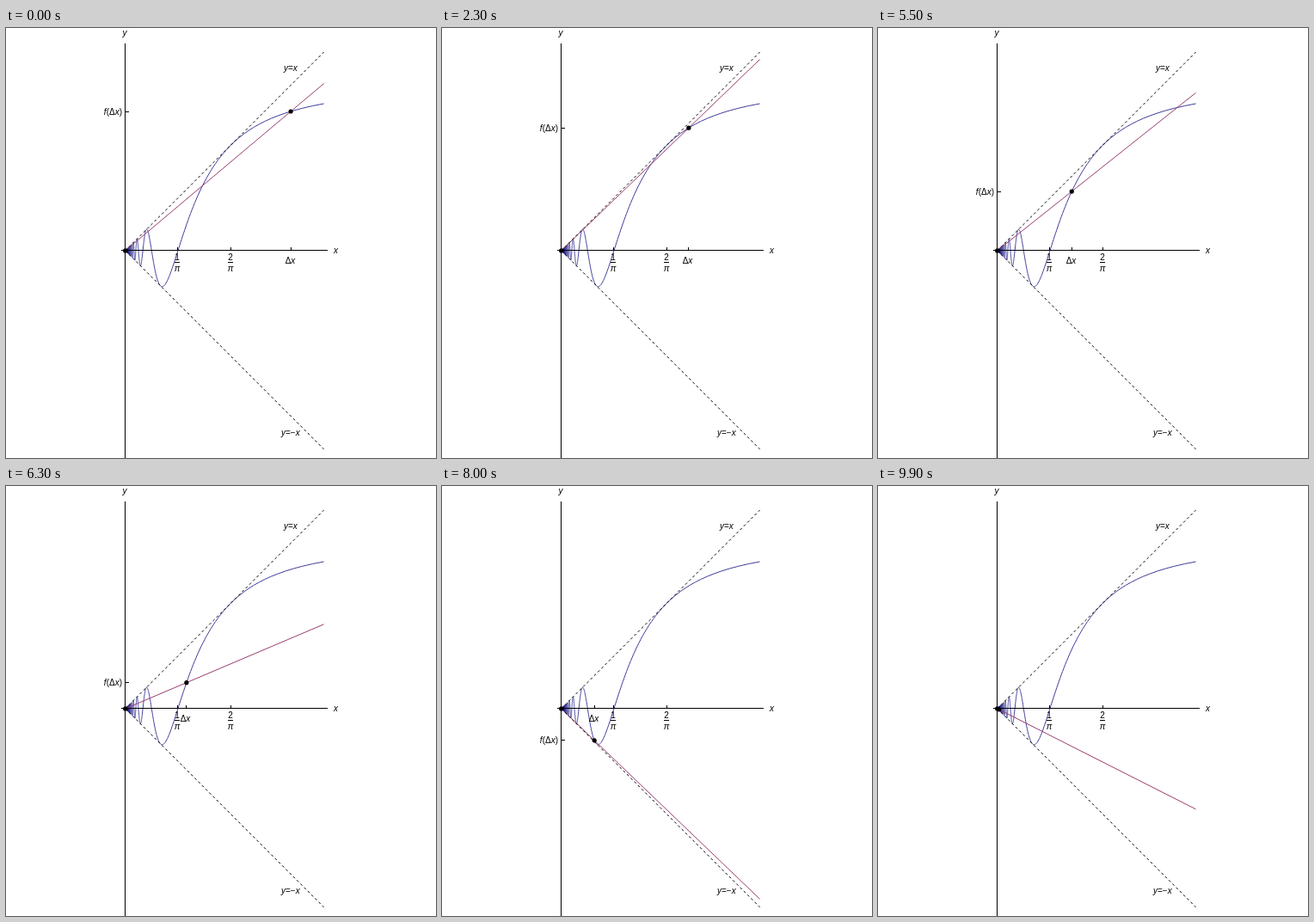
An HTML page for the animation above (10 s loop, 500 px wide and 500 px high).

```html
<!DOCTYPE html>
<html lang="en">
<head>
<meta charset="utf-8">
<title>Secants of x sin(1/x)</title>
<style>
html, body { margin: 0; width: 100%; height: 100%; overflow: hidden; background: #fff; }
svg { display: block; width: 500px; height: 500px; }
text { font: 10px "Liberation Sans", Arial, sans-serif; fill: #000; }
.i { font-style: italic; }
.mid { text-anchor: middle; }
.axis { stroke: #000; fill: none; }
.dash { stroke: #000; stroke-dasharray: 3 3; fill: none; }
</style>
</head>
<body>
<svg viewBox="0 0 500 500">
  <path id="curve" fill="none" stroke="#3f3d99"/>
  <path id="secant" fill="none" stroke="#993d71"/>
  <path id="up" class="dash"/>
  <path id="down" class="dash"/>
  <path class="axis" d="M134 258.5H374M138.5 18V500"/>
  <g id="fixed"></g>
  <g id="xMark">
    <path class="axis" d="M0 258V255"/>
    <text class="mid" x="-1" y="274">Δ<tspan class="i">x</tspan></text>
  </g>
  <g id="yMark">
    <path class="axis" d="M138 0H143"/>
    <text x="135" y="3" text-anchor="end"><tspan class="i">f</tspan>(Δ<tspan class="i">x</tspan>)</text>
  </g>
  <text class="i mid" x="383.5" y="262">x</text>
  <text class="i mid" x="138" y="9">y</text>
  <text x="323" y="50"><tspan class="i">y</tspan>=<tspan class="i">x</tspan></text>
  <text x="320" y="474"><tspan class="i">y</tspan>=−<tspan class="i">x</tspan></text>
  <circle id="origin" r="2.6"/>
  <circle id="dot" r="2.6"/>
</svg>
<script>
const SCALE = 192.4, X0 = 138.7, Y0 = 258.9, END = 1.2;
const STEP_MS = 100, STEPS = 100;
const MIN_GAP = 4; // labels this close to an axis are dropped

const el = id => document.getElementById(id);
const px = x => X0 + SCALE * x;
const py = y => Y0 - SCALE * y;
const snap = v => Math.floor(v) + 0.5;
const f = x => x * Math.sin(1 / x);
const ray = slope => `M${X0} ${Y0}L${px(END)} ${py(slope * END)}`;

function place(dot, x, y) {
  dot.setAttribute("cx", px(x));
  dot.setAttribute("cy", py(y));
}

function drawCurve() {
  // even steps in 1/x follow the oscillation down to the origin
  const pts = [];
  for (let u = 1 / END; u < 160; u += 0.05) {
    pts.push(px(1 / u).toFixed(2) + " " + py(f(1 / u)).toFixed(2));
  }
  el("curve").setAttribute("d", "M" + pts.join("L"));
}

function drawFraction(n) {
  const x = snap(px(n / Math.PI));
  const c = x - 0.5;
  el("fixed").innerHTML += `<path class="axis" d="M${x} 258V255M${c - 3} 272.5H${c + 3}"/>
    <text class="mid" x="${c}" y="270">${n}</text>
    <text class="mid i" x="${c}" y="283">π</text>`;
}

function show(mark, dx, dy, offset) {
  mark.setAttribute("transform", `translate(${dx} ${dy})`);
  mark.style.display = Math.abs(offset) * SCALE < MIN_GAP ? "none" : "";
}

let last = -1;
function render(now) {
  const n = Math.floor(now / STEP_MS) % STEPS;
  if (n !== last) {
    last = n;
    const x = 1 - n / STEPS, y = f(x);
    el("secant").setAttribute("d", ray(y / x));
    place(el("dot"), x, y);
    show(el("xMark"), snap(px(x)), 0, x);
    show(el("yMark"), 0, snap(py(y)), y);
  }
  requestAnimationFrame(() => render(performance.now() - start));
}

drawCurve();
el("up").setAttribute("d", ray(1));
el("down").setAttribute("d", ray(-1));
drawFraction(1);
drawFraction(2);
place(el("origin"), 0, 0);
const start = performance.now();
render(0);
</script>
</body>
</html>
```
